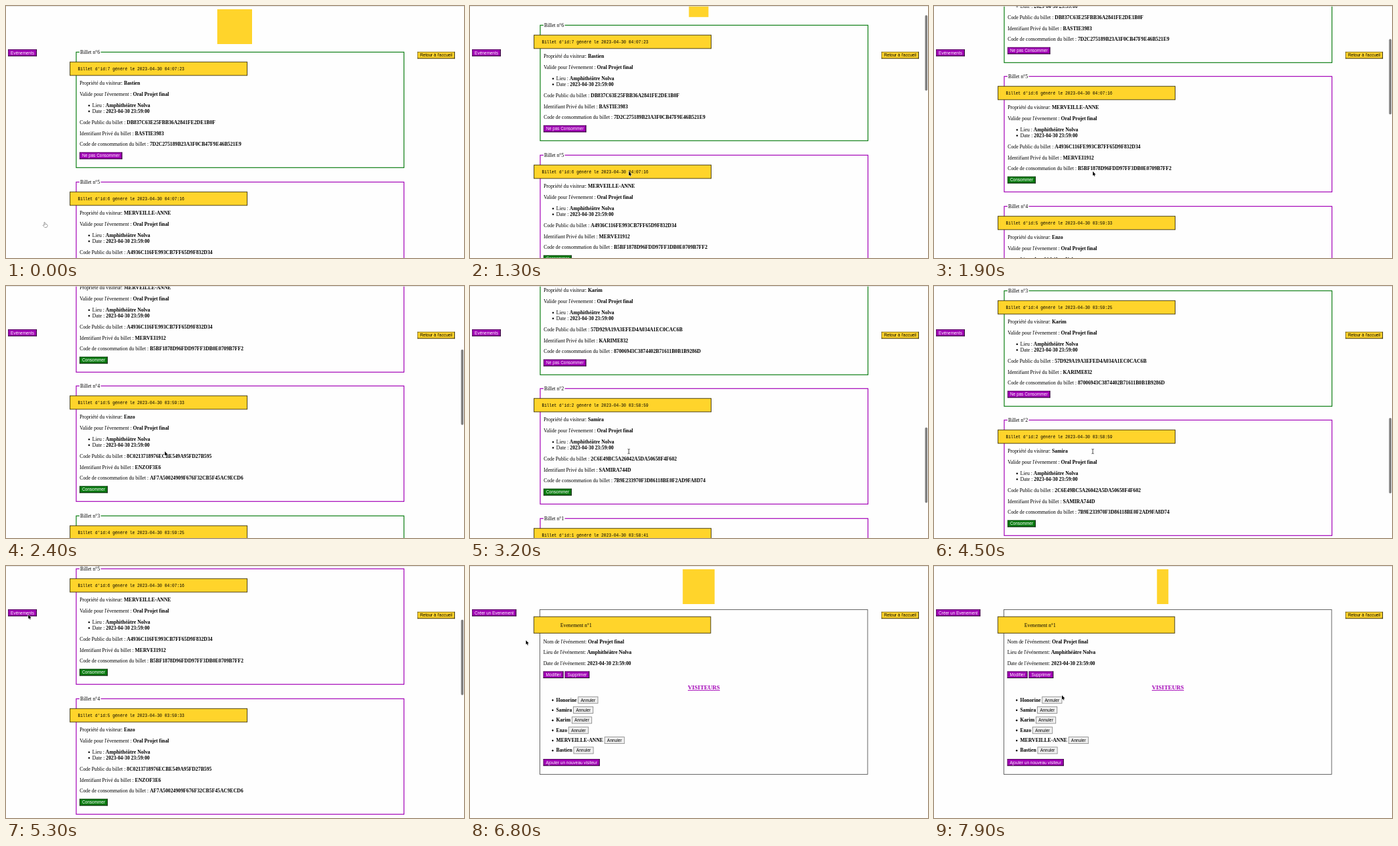
An HTML page with a canvas that plays this animation: 698 px wide and 384 px high, repeating every 8 s.

```html
<!DOCTYPE html>
<html lang="fr">
<head>
<meta charset="utf-8">
<title>Billets</title>
<style>
html, body { margin: 0; width: 100%; height: 100%; overflow: hidden; background: #fefefe; }
canvas { display: block; width: 698px; height: 384px; }
</style>
</head>
<body>
<canvas id="stage"></canvas>
<script>
const W = 698, H = 384, LOOP = 8000, NAV = 6250, PAGE_H = 1254;
const PURPLE = '#a200b6', GREEN = '#0b7d12', YELLOW = '#ffd42b';
const SERIF = '"Liberation Serif", "Times New Roman", serif';
const BODY = `7.77px ${SERIF}`, BOLD = `bold 7.77px ${SERIF}`;
const SANS = '6.46px "Liberation Sans", Arial, sans-serif';
const MONO = '6.3px "Liberation Mono", "Courier New", monospace';
const EVENT = 'Oral Projet final', PLACE = 'Amphithéâtre Nolva', DATE = '2023-04-30 23:59:00';

// number, id, time, visitor, public code, private id, use code, used
const tickets = [
  [6, 7, '04:07:23', 'Bastien', 'DB837C63E25FBB36A2841FE2DE1B0F', 'BASTIE3983', '7D2C275189B23A3F0CB47F9E46B521E9', true],
  [5, 6, '04:07:16', 'MERVEILLE-ANNE', 'A4936C116FE993CB7FF65D9F832D34', 'MERVEI1912', 'B5BF1878D96FDD97FF3DB0E0709B7FF2', false],
  [4, 5, '03:59:33', 'Enzo', '8C0213718976ECBE549A95FD27B595', 'ENZOF3E6', 'AF7A50024909F676F32CB5F45AC9ECD6', false],
  [3, 4, '03:59:25', 'Karim', '57D929A19A3EFED4A034A1EC0CAC6B', 'KARIME832', '87006943C3874402B71611B0B1B9286D', true],
  [2, 2, '03:58:59', 'Samira', '2C6E49BC5A26042A5DA50658F4F602', 'SAMIRA744D', '7B9E233970F3D86118BE0F2AD9FA8D74', false],
  [1, 1, '03:58:41', 'Honorine', '5104C7C933049685BE6020EECAD3C0', 'HONORI77F4', 'DEFC225FF9D99126F057650D075F6F9A', false]
];

// [ms, value...]
const scrollKeys = [[800, 0], [1300, 41], [1800, 130], [2400, 313], [2800, 505], [3200, 704],
  [3500, 825], [3800, 870], [4200, 870], [4400, 760], [4800, 350], [5000, 264]];
const mouseKeys = [[250, 59, 330], [850, 242, 252], [4850, 242, 252], [5250, 34, 74],
  [6500, 34, 74], [7300, 195, 197]];

const canvas = document.getElementById('stage');
const dpr = window.devicePixelRatio || 1;
canvas.width = W * dpr;
canvas.height = H * dpr;
const g = canvas.getContext('2d');

function track(keys, t, ease = u => u) {
  if (t <= keys[0][0]) return keys[0].slice(1);
  for (let i = 1; i < keys.length; i++) {
    const a = keys[i - 1], b = keys[i];
    if (t < b[0]) {
      const u = ease((t - a[0]) / (b[0] - a[0]));
      return a.slice(1).map((v, k) => v + (b[k + 1] - v) * u);
    }
  }
  return keys[keys.length - 1].slice(1);
}

const smooth = u => u * u * (3 - 2 * u);

function text(s, x, y, font = BODY, color = '#000') {
  g.font = font;
  g.fillStyle = color;
  g.fillText(s, x, y);
  return x + g.measureText(s).width;
}

// y is the middle of the line
function field(label, value, x, y) {
  text(value, text(label + ' ', x, y + 2.5), y + 2.5, BOLD);
}

function box(x, y, w, h, fill, stroke, line = 1) {
  if (fill) {
    g.fillStyle = fill;
    g.fillRect(x, y, w, h);
  }
  g.strokeStyle = stroke;
  g.lineWidth = line;
  g.strokeRect(x, y, w, h);
}

function button(label, x, y, fill, color = '#fff') {
  g.font = SANS;
  const w = g.measureText(label).width + 7.8, h = 10.5;
  g.fillStyle = fill;
  g.fillRect(x, y, w, h);
  g.fillStyle = 'rgba(0,0,0,.5)';
  g.fillRect(x, y, w, 0.9);
  g.fillRect(x, y, 0.9, h);
  g.fillStyle = 'rgba(0,0,0,.8)';
  g.fillRect(x, y + h - 1, w, 1);
  g.fillRect(x + w - 1, y, 1, h);
  text(label, x + 3.9, y + 7.5, SANS, color);
}

function plainButton(label, x, y) {
  g.font = SANS;
  const w = g.measureText(label).width + 7.8;
  box(x, y, w, 10, '#efefef', '#808080', 0.8);
  text(label, x + 3.9, y + 7.3, SANS);
}

function dot(x, y) {
  g.fillStyle = '#000';
  g.beginPath();
  g.arc(x, y, 1.25, 0, 7);
  g.fill();
}

function logo(t, y) {
  const w = 53 * Math.abs(Math.cos(t / 8400 * 2 * Math.PI));
  g.fillStyle = YELLOW;
  g.fillRect(348.5 - w / 2, y, w, 53);
}

function ticket([num, id, time, name, pub, priv, use, used], y) {
  const color = used ? GREEN : PURPLE;
  box(107, y, 499.5, 176, null, color, 1.2);
  const title = 'Billet n°' + num;
  g.font = BODY;
  g.fillStyle = '#fefefe';
  g.fillRect(112, y - 2, g.measureText(title).width + 2.4, 4);
  text(title, 113, y + 2.5);
  box(97.5, y + 15, 270, 20.5, YELLOW, '#4d4110');
  text(`Billet d'id:${id} généré le 2023-04-30 ${time}`, 109.4, y + 27.4, MONO);
  field('Propriété du visiteur:', name, 112.2, y + 47.5);
  field("Valide pour l'évenement :", EVENT, 112.2, y + 64.3);
  dot(126.6, y + 81.5);
  field('Lieu :', PLACE, 131.6, y + 81.2);
  dot(126.6, y + 90.3);
  field('Date :', DATE, 131.6, y + 90);
  field('Code Public du billet :', pub, 112.2, y + 106.9);
  field('Identifiant Privé du billet :', priv, 112.2, y + 123.7);
  field('Code de consommation du billet :', use, 112.2, y + 140.5);
  button(used ? 'Ne pas Consommer' : 'Consommer', 112, y + 152.5, used ? PURPLE : GREEN);
}

function ticketPage(t) {
  const [scroll] = track(scrollKeys, t);
  logo(t, 5 - scroll);
  tickets.forEach((item, i) => {
    const y = Math.round(70.4 + 197.6 * i - scroll) + 0.3;
    if (y < H + 5 && y > -185) ticket(item, y);
  });
  button('Evénements', 3.2, 66, PURPLE);
  if (t > 850 && t < 5700) {
    g.globalAlpha = Math.min(1, (5700 - t) / 250);
    g.fillStyle = '#7f7f7f';
    g.beginPath();
    g.roundRect(693.5, 1.5 + scroll * (H - 3) / PAGE_H, 3.6, 115, 1.8);
    g.fill();
    g.globalAlpha = 1;
  }
}

function eventPage(t) {
  logo(t - NAV, 5);
  box(106.5, 66.5, 499.5, 251, null, '#555', 0.9);
  box(97.3, 77.3, 269.5, 25, YELLOW, '#4d4110');
  text('Evenement n°1', 137.8, 92.5);
  field("Nom de l'événement:", EVENT, 111.7, 115);
  field("Lieu de l'événement:", PLACE, 111.7, 131.7);
  field("Date de l'événement:", DATE, 111.7, 148.4);
  button('Modifier', 111.7, 160.5, PURPLE);
  button('Supprimer', 144.5, 160.5, PURPLE);
  const end = text('VISITEURS', 332, 188, `bold 9.07px ${SERIF}`, PURPLE);
  g.fillRect(332, 189, end - 332, 0.9);
  tickets.slice().reverse().forEach((item, i) => {
    const y = 204.2 + 15.35 * i;
    dot(126, y + 0.3);
    plainButton('Annuler', text(item[3], 131.2, y + 2.5, BOLD) + 2.2, y - 5);
  });
  button('Ajouter un nouveau visiteur', 111.7, 294, PURPLE);
  button('Créer un Evenement', 3.2, 66, PURPLE);
}

function shape(points, fill, stroke, width) {
  g.beginPath();
  points.forEach(([x, y]) => g.lineTo(x, y));
  g.closePath();
  g.lineJoin = 'round';
  g.strokeStyle = stroke;
  g.lineWidth = width;
  g.stroke();
  g.fillStyle = fill;
  g.fill();
}

function beam() {
  for (const [color, width] of [['#fff', 1.8], ['#222', 0.8]]) {
    g.strokeStyle = color;
    g.lineWidth = width;
    g.beginPath();
    g.moveTo(-1.6, -3.6);
    g.quadraticCurveTo(0, -3.6, 0, -2.4);
    g.lineTo(0, 2.4);
    g.quadraticCurveTo(0, 3.6, -1.6, 3.6);
    g.moveTo(1.6, -3.6);
    g.quadraticCurveTo(0, -3.6, 0, -2.4);
    g.moveTo(0, 2.4);
    g.quadraticCurveTo(0, 3.6, 1.6, 3.6);
    g.stroke();
  }
}

function mouse(t) {
  const [x, y] = track(mouseKeys, t, smooth);
  g.save();
  g.translate(x, y);
  if (t < 300) {
    shape([[-0.8, 0], [0.3, 0], [0.8, 2.6], [3.4, 3], [4, 4], [3.6, 6], [2.8, 7.4], [0, 7.4], [-2.4, 4.4], [-1.6, 3.8], [-0.4, 4.6]],
      '#fff', '#333', 1);
  } else if (t > 2850 && t < 4600) {
    beam();
  } else {
    shape([[0, 0], [0, 6.4], [1.4, 5.2], [2.5, 7.6], [3.5, 7.1], [2.5, 4.9], [4.4, 4.7]], '#000', '#fff', 1);
  }
  g.restore();
}

function draw(t) {
  g.setTransform(dpr, 0, 0, dpr, 0, 0);
  g.fillStyle = '#fefefe';
  g.fillRect(0, 0, W, H);
  if (t < NAV) ticketPage(t);
  else eventPage(t);
  button("Retour à l'accueil", 627, 69.8, YELLOW, '#000');
  g.fillStyle = '#dedede';
  g.fillRect(0, 0, W, 0.8);
  mouse(t);
}

const start = performance.now();
function tick() {
  draw((performance.now() - start) % LOOP);
  requestAnimationFrame(tick);
}
tick();
</script>
</body>
</html>
```
